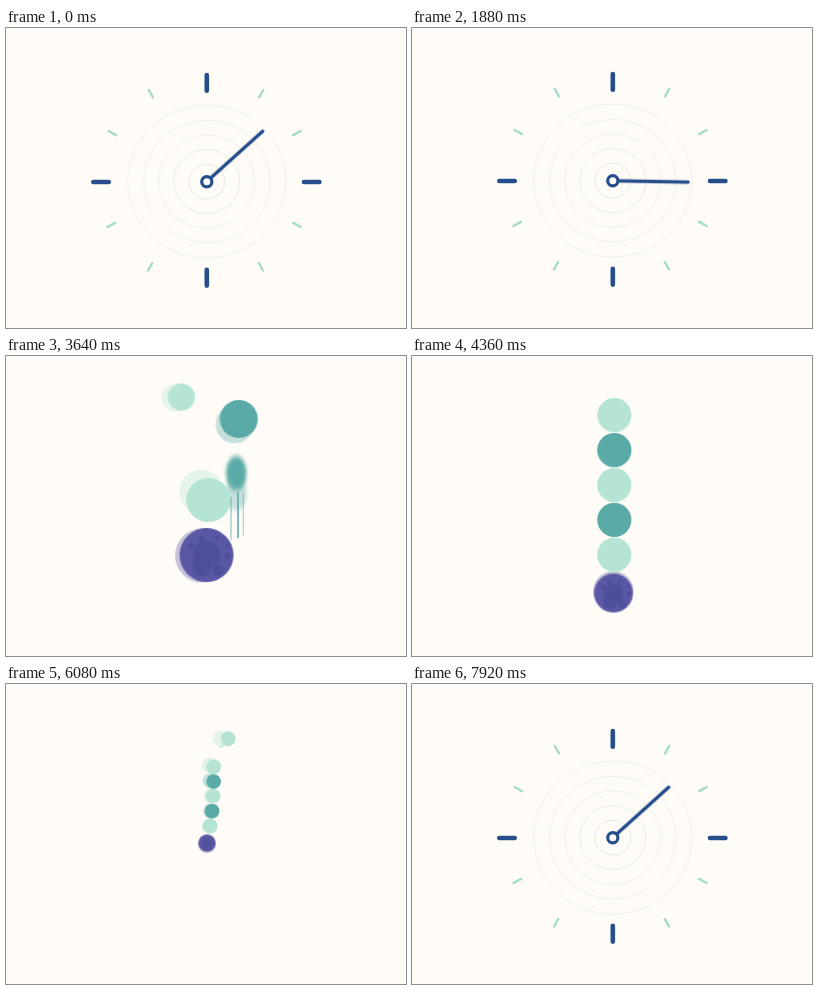
Animation, 400 px wide and 300 px high, one loop 7960 ms. Source, as an HTML page without scripts:

```html
<!DOCTYPE html>
<html lang="en">
<head>
<meta charset="utf-8">
<title>Clock and bouncing balls</title>
<style>
html, body { margin: 0; width: 100%; height: 100%; overflow: hidden; background: #fffcf7; }
svg { display: block; width: 400px; height: 300px; }
svg * { animation: 7960ms linear var(--lag, 0ms) infinite; }

/* Clock */
.dial { animation-name: drift; }
.ticks, .rings, .hand { transform-origin: 200.5px 153.8px; }
.ticks { animation-name: pop; fill: none; stroke-linecap: round; }
.ticks path { animation-name: fall; animation-delay: var(--d, 0ms); }
.major { stroke: #264d8c; stroke-width: 4.6; }
.minor { stroke: #a6dcca; stroke-width: 2.5; }
.rings { animation-name: rings; fill: none; stroke: #ebf0ea; stroke-width: .9; }
.hand { animation-name: sweep; stroke: #264d8c; stroke-width: 3.5; stroke-linecap: round; }
.hub { animation-name: hub; fill: #fffcf7; stroke: #264d8c; stroke-width: 3.2; }

@keyframes drift {
  0%, 100% { transform: none; animation-timing-function: ease-in-out; }
  23.62% { transform: translateY(-1px); }
  25.13% { transform: translateY(-2px); }
  30%, 81% { transform: none; }
  84.42% { transform: translateY(-1px); animation-timing-function: ease-in-out; }
}
@keyframes fall {
  0%, 25.13% { transform: none; animation-timing-function: cubic-bezier(.5, 0, .9, .6); }
  28.89%, 80% { transform: translateY(275px); }
  80.01%, 100% { transform: none; }
}
@keyframes pop {
  0%, 30% { transform: none; opacity: 1; }
  30.01%, 80.4% { transform: scale(.6); opacity: 0; animation-timing-function: ease-out; }
  82.91% { transform: scale(1.03); opacity: 1; }
  85.43% { transform: scale(.99); }
  87.44%, 100% { transform: none; opacity: 1; }
}
@keyframes rings {
  0%, 25.13% { transform: none; opacity: 1; animation-timing-function: ease-in; }
  28.64%, 80.4% { transform: scale(0); opacity: 0; animation-timing-function: ease-out; }
  84.42% { transform: scale(1.02); opacity: 1; }
  87.44%, 100% { transform: none; opacity: 1; }
}
@keyframes sweep {
  0% { transform: rotate(48deg); opacity: 1; animation-timing-function: ease-in-out; }
  23.62% { transform: rotate(91deg); animation-timing-function: ease-in; }
  26.63% { transform: rotate(165deg); opacity: 1; }
  28.64% { transform: rotate(200deg) scaleY(.05); opacity: 1; }
  28.7%, 79.6% { transform: rotate(48deg); opacity: 0; }
  80.9% { transform: rotate(48deg); opacity: 1; animation-timing-function: ease-in-out; }
  82.91% { transform: rotate(53deg); animation-timing-function: ease-in-out; }
  85.43% { transform: rotate(46deg); animation-timing-function: ease-in-out; }
  90.45%, 100% { transform: rotate(48deg); opacity: 1; }
}
@keyframes hub {
  0%, 28.64% { opacity: 1; }
  29%, 79.9% { opacity: 0; }
  80.9%, 100% { opacity: 1; }
}

/* Big ball */
.big { animation-name: big; fill: #5a58a4; }
.craters { fill: #4f4e98; animation-name: craters; }
@keyframes big {
  0%, 28% { transform: translate(200.5px, 153px) scale(.24); opacity: 0; }
  28.64% { transform: translate(200.5px, 153px) scale(.3); opacity: 1; animation-timing-function: ease-out; }
  30.65% { transform: translate(200px, 158px) scale(1.15, 1.1); }
  31.66% { transform: translate(202px, 162px) scale(1.15, 1.27); }
  32.16% { transform: translate(205px, 162.7px) scale(1.11, 1.27); }
  33.67% { transform: translate(204px, 172px) scale(1.22, 1.05); animation-timing-function: ease-out; }
  35.68% { transform: translate(152px, 104px) scale(1.1, 1.25); animation-timing-function: ease-in; }
  37.69% { transform: translate(172px, 150px) scale(1.1, 1.2); }
  39.7% { transform: translate(194px, 236px) scale(1.22, 1.05); animation-timing-function: ease-out; }
  43.22% { transform: translate(182px, 204px) scale(1.04); }
  44.72% { transform: translate(192px, 200px) scale(1.02); }
  45.73% { transform: translate(200.5px, 199px) scale(1); }
  46.73% { transform: translate(204px, 201px) scale(1.02, .97); animation-timing-function: ease-in-out; }
  50.25% { transform: translate(201px, 230px) scale(.82); }
  54.27% { transform: translate(201.3px, 235px) scale(.74); }
  54.77% { transform: translate(201.5px, 237px) scale(.72); }
  57.79% { transform: translate(201.3px, 238px) scale(.74, .71); }
  61.31% { transform: translate(201.3px, 237px) scale(.72); animation-timing-function: ease-in-out; }
  70.35% { transform: translate(201px, 178px) scale(.47); }
  72.86% { transform: translate(201px, 168px) scale(.4); }
  76.38% { transform: translate(201px, 159px) scale(.32); }
  79.9% { transform: translate(200.5px, 153.8px) scale(.24); opacity: 1; }
  80.9%, 100% { transform: translate(200.5px, 153.8px) scale(.24); opacity: 0; }
}
@keyframes craters {
  0%, 31% { opacity: .2; }
  45.73%, 61% { opacity: 1; }
  74%, 100% { opacity: .6; }
}

/* Small balls: one shared stack, each with its own way in */
.ball { transform-box: fill-box; transform-origin: center; }
.mint { fill: #b6e4d4; }
.teal { fill: #5aaba7; }
.a { --i: 0; --x: 204px; --y: 142px; animation-name: stack, a; }
.b { --i: 1; --x: 206px; --y: 127px; animation-name: stack, b; }
.c { --i: 2; --x: 207px; --y: 112px; animation-name: stack, c; }
.d { --i: 3; --x: 207.5px; --y: 97.5px; animation-name: stack, d; }
.e { --i: 4; --x: 207.5px; --y: 82.5px; animation-name: stack, e; }
.f { --i: 5; --x: 222px; --y: 54.5px; animation-name: stack, f; }
.ghost { --lag: -7920ms; opacity: .35; }

@keyframes stack {
  0%, 40% { opacity: 0; }
  40.1%, 81% { opacity: 1; }
  81.41%, 100% { opacity: 0; }
  0%, 54.77%, 61.31% { cx: 202.3px; cy: calc(199px - 35px * var(--i)); r: 17px; animation-timing-function: ease-in-out; }
  57.79% { cx: 202.3px; cy: calc(200px - 34.7px * var(--i)); r: 17px; animation-timing-function: ease-in-out; }
  70.35% { cx: 201px; cy: calc(154px - 22px * var(--i)); r: 11px; animation-timing-function: ease-out; }
  72.86% { cx: calc(201px - 1px * (var(--i) + 1) * (var(--i) + 1)); cy: calc(147px - 18.5px * var(--i)); r: 9.3px; }
  76.38% { cx: var(--x); cy: var(--y); r: 7.4px; }
  79.15% { cx: calc(200.5px + 9.4px * (var(--i) + 1)); cy: calc(153.8px - 8.5px * (var(--i) + 1)); r: 6px; }
  81.41%, 100% { cx: calc(200.5px + 9.4px * (var(--i) + 1)); cy: calc(153.8px - 8.5px * (var(--i) + 1)); r: 1.7px; }
}
@keyframes a {
  0%, 40.7% { transform: translate(-232px, -80px) scale(1.3); }
  42.71% { transform: translate(-100px, -125px) scale(1.3); }
  44.72% { transform: translate(-14px, -72px) scale(1.3); }
  45.73% { transform: translate(0, -55px) scale(1.3); }
  46.73% { transform: translate(2px, -48px) scale(1.3, 1.24); animation-timing-function: ease-in-out; }
  50.25% { transform: translate(0, -8px) scale(1.1); }
  54.77%, 100% { transform: none; }
}
@keyframes b {
  0%, 41% { transform: translate(-50px, 165px) scale(1.2); }
  42.71% { transform: translate(-5px, 12px) scale(1.1, 1.3); }
  44.72% { transform: translate(22px, -90px) scale(1.12); }
  45.73% { transform: translate(30.5px, -101px) scale(1.12); animation-timing-function: ease-out; }
  47.24% { transform: translate(28px, -102px) scale(1.1); animation-timing-function: ease-in; }
  50.25% { transform: translate(2px, -20px) scale(1.05); }
  51.76% { transform: translate(0, -4px) scale(1.05, .95); }
  54.77%, 100% { transform: none; }
}
@keyframes c {
  0%, 41.71% { transform: translate(-225px, -10px) scale(.8); }
  43.72% { transform: translate(-105px, -70px) scale(.8); }
  44.72% { transform: translate(-40px, -86px) scale(.8); }
  45.73% { transform: translate(-27px, -88px) scale(.8); }
  47.24% { transform: translate(-10px, -82px) scale(.85); animation-timing-function: ease-in; }
  51% { transform: translate(0, -10px) scale(.98); }
  52.26% { transform: translate(0, 3px) scale(1.04, .95); }
  54.77%, 100% { transform: none; }
}
@keyframes d {
  0%, 43.72% { transform: translate(27px, 240px) scale(.6, 1.2); filter: blur(2px); animation-timing-function: ease-out; }
  45.73% { transform: translate(28px, 24px) scale(.6, 1); filter: blur(2.5px); animation-timing-function: ease-out; }
  47.74% { transform: translate(20px, -64px) scale(.9, 1); filter: blur(0); }
  48.74% { transform: translate(11px, -69px); animation-timing-function: ease-in; }
  52.26% { transform: translate(0, -4px); }
  53.27% { transform: translate(0, 3px) scale(1.04, .95); }
  54.77%, 100% { transform: none; filter: blur(0); }
}
@keyframes e {
  0%, 46.23% { transform: translate(-225px, 40px); }
  48.24% { transform: translate(-120px, -18px); }
  50.25% { transform: translate(-38px, -35px); }
  51.76% { transform: translate(-8px, -30px); animation-timing-function: ease-in; }
  53.52% { transform: translate(0, 3px) scale(1.04, .95); }
  54.77%, 100% { transform: none; }
}
@keyframes f {
  0%, 61.56% { transform: translate(-225px, 90px); }
  63.82% { transform: translate(-120px, 20px); }
  65.33% { transform: translate(-50px, -2px); }
  66.83% { transform: translate(-10px, -6px); animation-timing-function: ease-in; }
  68.34% { transform: translateY(3px) scale(1.04, .95); }
  70.35%, 100% { transform: none; }
}

/* Speed lines */
.streaks { animation-name: streaks; fill: none; stroke: #5aaba7; stroke-linecap: round; }
@keyframes streaks {
  0%, 44.4% { transform: translateY(110px); opacity: 0; }
  44.72% { transform: translateY(80px); opacity: 1; }
  45.73% { transform: none; opacity: 1; }
  47.24%, 100% { transform: translateY(-50px); opacity: 0; }
}
.flick { animation-name: flick; fill: none; stroke: #b6e4d4; stroke-width: 1.5; stroke-linecap: round; }
@keyframes flick {
  0%, 75.5%, 77.5%, 100% { opacity: 0; }
  76%, 76.8% { opacity: 1; }
}
</style>
</head>
<body>
<svg viewBox="0 0 400 300">
  <g class="dial">
    <g class="rings">
      <ellipse cx="200.8" cy="153.6" rx="18" ry="17.4" stroke="#e0e8e4"/>
      <ellipse cx="200.8" cy="153.6" rx="33" ry="32" stroke="#e4ebe6"/>
      <ellipse cx="200.8" cy="153.6" rx="48" ry="46.7"/>
      <ellipse cx="200.8" cy="153.6" rx="63.3" ry="61.3"/>
      <ellipse cx="200.8" cy="153.6" rx="79" ry="76.5"/>
    </g>
    <g class="ticks">
      <g class="minor">
        <path d="M142.8 62l4.2 7.5" style="--d:40ms"/>
        <path d="M257.2 62l-4.2 7.5" style="--d:60ms"/>
        <path d="M102.5 103l7.5 4.2" style="--d:20ms"/>
        <path d="M294.7 103l-7.5 4.2" style="--d:50ms"/>
        <path d="M101.5 199l7.5-4.2"/>
        <path d="M294.7 199l-7.5-4.2" style="--d:30ms"/>
        <path d="M142 242.5l4.2-7.5"/>
        <path d="M257 242.5l-4.2-7.5" style="--d:10ms"/>
      </g>
      <g class="major">
        <path d="M200.8 47v15.8" style="--d:70ms"/>
        <path d="M200.8 241.8v15.8"/>
        <path d="M87.3 154h15.4" style="--d:20ms"/>
        <path d="M298 154h15.4" style="--d:40ms"/>
      </g>
    </g>
    <path class="hand" d="M200.5 148V78.2"/>
    <circle class="hub" cx="200.8" cy="153.7" r="5.1"/>
  </g>

  <g class="ghost">
    <circle class="big" r="27"/>
    <circle class="ball mint a"/>
    <circle class="ball teal b"/>
    <circle class="ball mint c"/>
    <circle class="ball teal d"/>
    <circle class="ball mint e"/>
    <circle class="ball mint f"/>
  </g>

  <g class="big">
    <circle r="27"/>
    <g class="craters">
      <circle r="13.5"/>
      <circle cx="-5" cy="12" r="9"/>
      <circle cx="12" cy="15" r="5.5"/>
      <circle cx="-5" cy="-16" r="3"/>
      <circle cx="-15" cy="-9" r="3"/>
      <circle cx="10" cy="-17" r="2"/>
      <circle cx="21" cy="-10" r="2"/>
      <circle cx="21" cy="1" r="3"/>
    </g>
  </g>
  <circle class="ball mint a"/>
  <circle class="ball teal b"/>
  <circle class="ball mint c"/>
  <circle class="ball teal d"/>
  <circle class="ball mint e"/>
  <circle class="ball mint f"/>

  <g class="streaks">
    <path d="M225 142v42" stroke-width=".8"/>
    <path d="M232 137v45" stroke-width="1.6"/>
    <path d="M237.3 138v42" stroke-width=".6"/>
  </g>
  <path class="flick" d="M214 63.5l4.5-3"/>
</svg>
</body>
</html>
```
